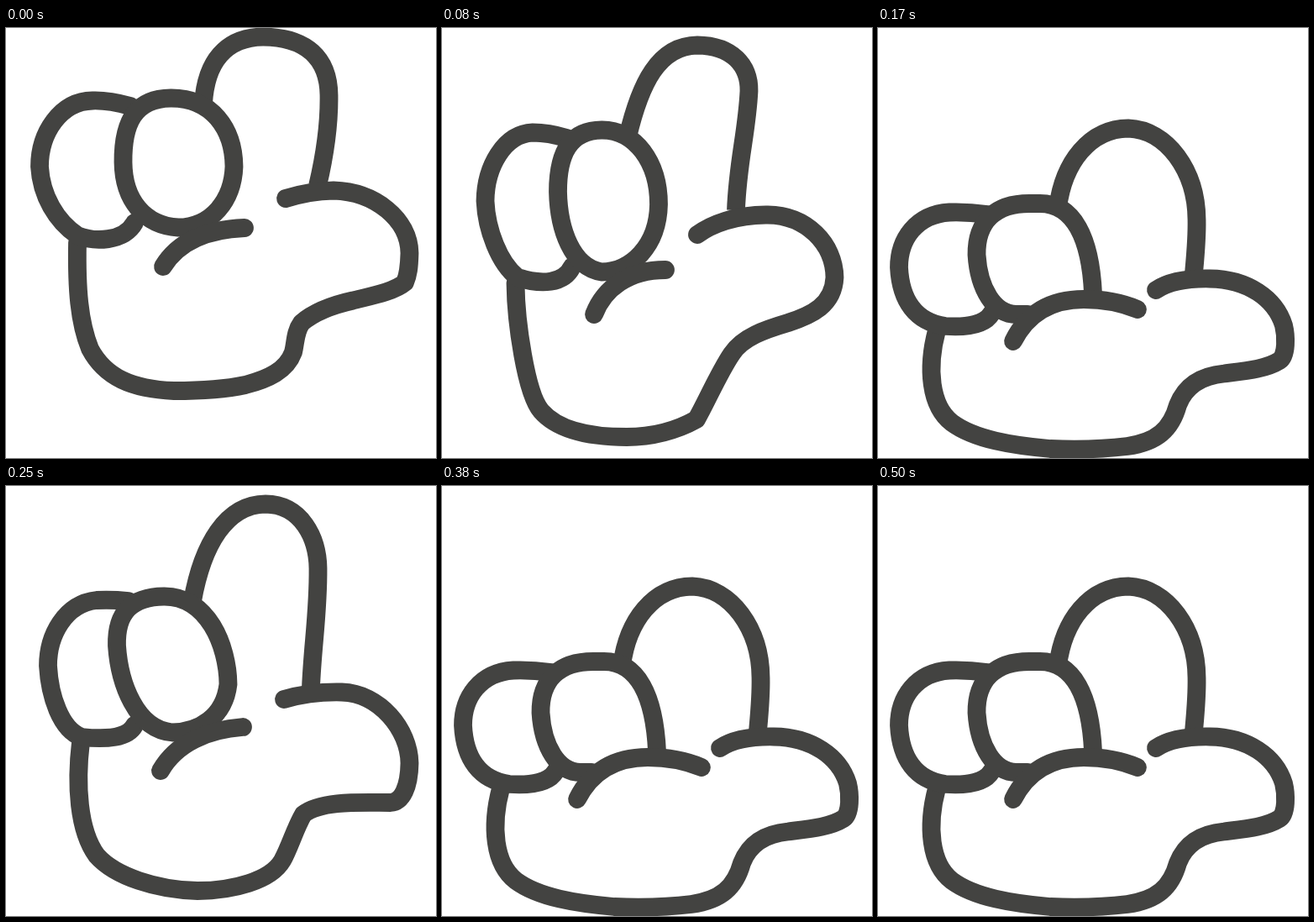
Animation, 512 px wide and 512 px high, one loop 0.58 s. Source, as an HTML page:

```html
<!DOCTYPE html>
<html lang="en">
<head>
<meta charset="utf-8">
<title>Waving hand</title>
<style>
  html, body { margin: 0; width: 100%; height: 100%; overflow: hidden; background: #fff; }
  svg { display: block; width: 100vw; height: 100vh; }
  g { opacity: 0; animation: 580ms step-end infinite; }
  path { fill: none; stroke: #434341; stroke-width: 21.8; stroke-linecap: round; stroke-linejoin: round; }
  .butt { stroke-linecap: butt; }

  /* Hard cuts at 80, 170, 250, 330, 420 and 500 ms */
  #raised { animation-name: raised; }
  #tilted { animation-name: tilted; }
  #folded { animation-name: folded; }
  #upright { animation-name: upright; }
  @keyframes raised { 0%, 72.4138% { opacity: 1 } 13.7931%, 86.2069%, 100% { opacity: 0 } }
  @keyframes tilted { 0%, 29.3103%, 100% { opacity: 0 } 13.7931% { opacity: 1 } }
  @keyframes folded { 0%, 43.1034%, 72.4138% { opacity: 0 } 29.3103%, 56.8966%, 86.2069%, 100% { opacity: 1 } }
  @keyframes upright { 0%, 56.8966%, 100% { opacity: 0 } 43.1034% { opacity: 1 } }
</style>
</head>
<body>
<!-- Each pose: index finger, thumb and palm, little finger, middle finger, crease -->
<svg viewBox="0 0 512 512">
  <g id="raised">
    <path class="butt" d="M235 90C238 40 262 11 306 10.5C358 11 384 36 384.5 80C385 118 380 150 371 188"/>
    <path d="M333 203C352 197 370 194 390 193.5C440 195 480 228 480.5 268C480 285 479 294 475 303C462 314 435 319 413 324.5C388 330 366 339 352 351C344 362 345 374 342 386C334 408 312 418 285 425C262 430 235 432 200 432C150 430 118 416 100 382C87 350 84 310 85 256"/>
    <path d="M148 93C130 88 118 86 103 86.5C65 87 40 125 40 165C42 200 60 230 85 247C105 255 140 255 153 232"/>
    <path d="M196 83.5C245 83 271 120 271.5 165C270 205 245 237 205 237.5C165 235 140 205 139.5 160C139 115 152 84 196 83.5Z"/>
    <path d="M187 284C203 258 232 240 284 238"/>
  </g>
  <g id="tilted">
    <path class="butt" d="M221 130C236 66 258 21 304 20.5C346 21 366 45 365.5 75C363 125 352 160 350 217"/>
    <path d="M304 246C320 234 350 222 388 222.5C434 223 467 257 467.5 297C466 330 440 342 412 351C385 359 358 368 345 388C330 410 315 445 303 466C280 479 250 487 220 487C175 487 137 478 118 456C100 435 88 350 87.5 304"/>
    <path d="M148 131C132 126 122 124.5 108 124.5C74 126 52 165 51.5 206C53 240 68 280 90 297C118 306 145 305 155 284"/>
    <path d="M190 121.5C230 121 258 160 258 210C257 260 225 290 190 290.5C155 285 139 240 138 195C138 150 152 122 190 121.5Z"/>
    <path d="M181 341C193 310 222 288 266 288"/>
  </g>
  <g id="folded">
    <path class="butt" d="M214 214C221 160 252 120 298 119.5C344 121 379 170 379.5 228C380 250 378 270 376 292"/>
    <path d="M331 312C346 302 368 298 395 298.5C440 299 473 322 483 354C486 366 487 390 478 396C462 406 440 408 412 411.5C385 414 366 426 357 449C349 478 332 493 297 498C265 502 230 502 205 501C160 497 115 490 88 470C62 450 58 405 70 360"/>
    <path d="M130 222C112 219.5 100 219 85 219.5C45 222 25 252 25 285C27 325 45 350 80 355C108 357 128 352 135 340"/>
    <path d="M256 316C253 250 233 209 193 209H180C140 209 117 230 117.5 270C120 310 138 341 165 341H178"/>
    <path d="M161 373C180 335 212 323 245 323C270 323 290 327 309 335"/>
  </g>
  <g id="upright">
    <path class="butt" d="M222 137C234 70 262 22 309 21.5C352 22 371 62 371.5 98C372 150 365 190 363 240"/>
    <path d="M331 254C355 247 380 245 400 245.5C445 247 480 290 480.5 330C480 358 472 376 458 377C425 377 375 374 354 391C344 408 338 430 329 446C315 470 270 482 228 482C180 481 130 465 108 440C86 410 83 355 89 305"/>
    <path d="M146 137C135 136 120 135.5 108 136C70 140 50 178 50 214C52 250 65 290 90 299C120 302 145 300 153 285"/>
    <path d="M188 131.5C240 131 264 190 264.5 236C260 275 230 293 198 293.5C155 290 135 235 132 190C131 150 150 132 188 131.5Z"/>
    <path d="M184 339C203 306 240 290 282 287"/>
  </g>
</svg>
</body>
</html>
```
